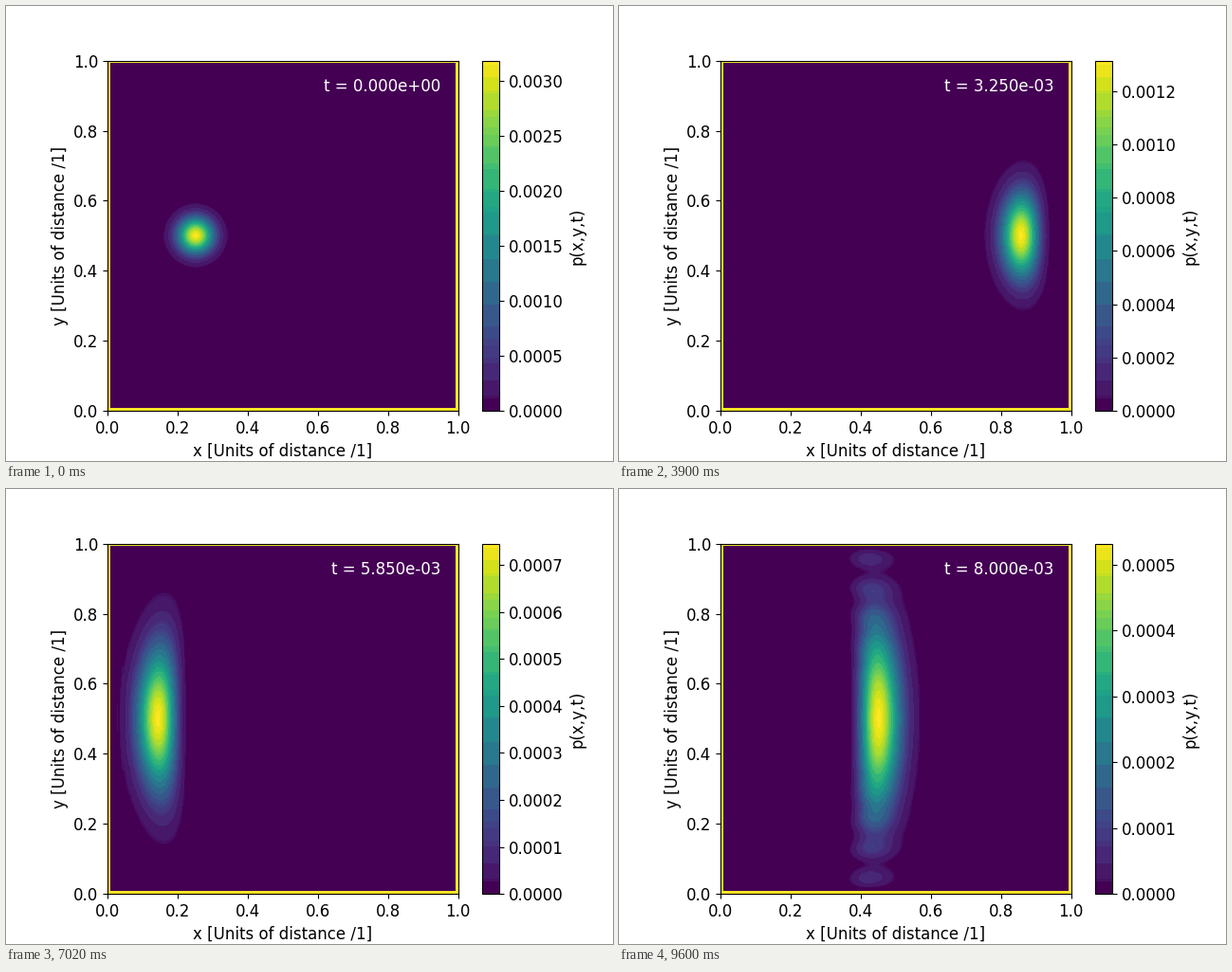
Write a matplotlib script that moves like this. It is 640 px wide and 480 px high and loops after 9.66 s.

```python
import numpy as np
import matplotlib.pyplot as plt
from matplotlib.animation import FuncAnimation
from matplotlib.colors import ListedColormap

plt.rcParams.update({"font.family": "DejaVu Sans", "font.size": 12})

FRAMES, INTERVAL = 161, 60
H, DT = 0.005, 2.5e-5       # grid spacing and solver step
STEPS = 2                   # solver steps per frame
XC, YC, SIGMA, PX = 0.25, 0.5, 0.05, 200
WALL = 1.0                  # far above any probability, saturates the map


def banded_viridis():
    """Viridis with its colours merged into coarse RGB buckets."""
    rgb = plt.get_cmap("viridis")(np.arange(256), bytes=True)[:, :3].astype(int)
    keys = rgb // [32, 16, 32]
    _, group = np.unique(keys, axis=0, return_inverse=True)
    group = group.ravel()
    bands = rgb.astype(float)
    for g in range(group.max() + 1):
        bands[group == g] = rgb[group == g].mean(axis=0)
    # The outer bands are dominated by background and wall colours.
    for end in (0, 255):
        bands[group == group[end]] = rgb[end]
    return ListedColormap(bands / 255)


# Crank-Nicolson in the sine eigenbasis of the discrete Laplacian
cells = round(1 / H)
k = np.arange(1, cells)
sines = np.sqrt(2 / cells) * np.sin(np.pi * np.outer(k, k) / cells)
energy = (2 - 2 * np.cos(np.pi * k / cells)) / H**2
phase = 2 * np.arctan(DT / 2 * (energy[:, None] + energy[None, :]))

x, y = np.meshgrid(k * H, k * H)
packet = np.exp(-((x - XC)**2 + (y - YC)**2) / (2 * SIGMA**2) + 1j * PX * x)
packet /= np.linalg.norm(packet)
modes = sines @ packet @ sines


def probability(step):
    u = sines @ (modes * np.exp(-1j * phase * step)) @ sines
    return np.abs(u)**2


def walled(p):
    return np.pad(p, 1, constant_values=WALL)


fig = plt.figure(figsize=(6.4, 4.8), dpi=100)
ax = fig.gca()
start = probability(0)
img = ax.imshow(walled(start), extent=[0, 1, 0, 1], origin="lower",
                cmap=banded_viridis(), vmin=0, vmax=start.max())
ax.set_xlabel("x [Units of distance /1]")
ax.set_ylabel("y [Units of distance /1]")
cbar = fig.colorbar(img, ax=ax)
cbar.set_label("p(x,y,t)")
clock = ax.text(0.95, 0.95, "", color="white", ha="right", va="top")


def update(i):
    step = i * STEPS
    p = probability(step)
    img.set_data(walled(p))
    img.set_clim(0, p.max())
    clock.set_text(f"t = {step * DT:.3e}")
    return img, clock


anim = FuncAnimation(fig, update, frames=FRAMES, interval=INTERVAL,
                     init_func=lambda: update(0), repeat=True,
                     repeat_delay=0, blit=False)
plt.show()
```
